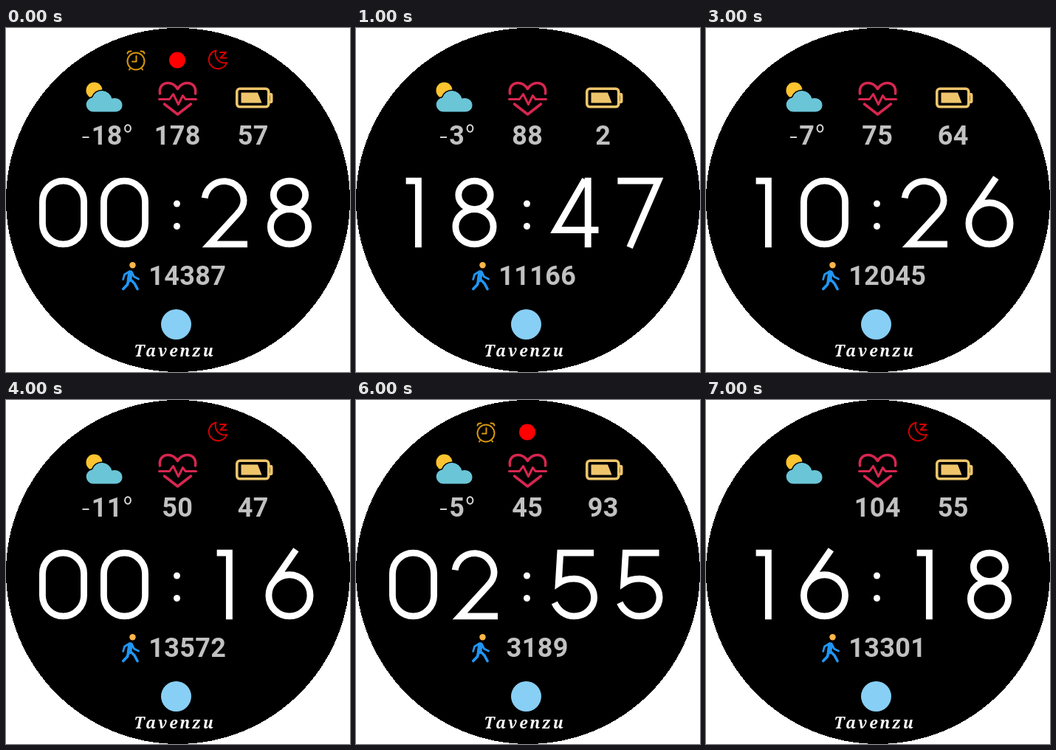
An HTML page that plays this animation: 466 by 466 pixels, repeating every 8 s.

```html
<!DOCTYPE html>
<html lang="en">
<head>
<meta charset="utf-8">
<title>Watch face</title>
<style>
html, body { margin: 0; width: 100%; height: 100%; overflow: hidden; background: #fff; }
svg { display: block; width: 100vw; height: 100vh; }
.num { font: 700 36px Roboto, "Liberation Sans", sans-serif; fill: #c1c1c1; text-anchor: middle; }
.brand { font: italic 900 21px "Noto Serif", "Liberation Serif", serif; letter-spacing: 2.8px; fill: #fff; text-anchor: middle; }
.line { fill: none; stroke-linecap: round; stroke-linejoin: round; }
</style>
</head>
<body>
<svg viewBox="0 0 466 466">
  <circle cx="233" cy="233" r="233" shape-rendering="crispEdges"/>

  <g id="alarm" class="line" stroke="#d6960f" stroke-width="2">
    <circle cx="176" cy="45" r="11.5"/>
    <path d="M176.5 38V45.5H171M164.5 34.500Q165 31 169.500 31.500M187.500 34.500Q187 31 182.500 31.500M168 55L167 56.500M184 55L185 56.500"/>
  </g>
  <circle id="link" cx="232" cy="43.5" r="11" fill="#f00"/>
  <g id="moon" class="line" stroke="#d80000" stroke-width="1.9">
    <path d="M284.5 30.5A12.5 12.5 0 1 0 299 47A12.5 12.5 0 0 1 284.5 30.5Z"/>
    <path d="M290 33H298L290.5 40.5H298.5"/>
  </g>

  <circle cx="119.5" cy="84.500" r="11" fill="#fcc42e"/>
  <path d="M118.5 113.500A9.700 9.700 0 0 1 117 94.200A13.700 13.700 0 0 1 143.300 95.600C151 93.500 157.500 98 157.500 104.500C157.500 110 153.500 113.500 148.500 113.500Z"
    fill="#6ac5d7" stroke="#000" stroke-width="3" paint-order="stroke"/>

  <g class="line" stroke="#d7264f" stroke-width="3.5">
    <path d="M208.5 89C207 79 213 74.5 219.5 74.5C226 74.5 230 78.5 232.5 82.5C235 78.5 239 74.5 245.5 74.5C252 74.5 258 79 256.5 89"/>
    <path d="M214.5 103L232.5 117L250.5 103"/>
    <path d="M207.5 96.5H221.5L226.5 89.5L233.5 103.5L239.5 91.5L243 96.5H257.5" stroke-width="3"/>
  </g>

  <g fill="#efc56c" transform="translate(.5 0)">
    <rect x="312.3" y="82.3" width="43" height="24.5" rx="4" fill="none" stroke="#efc56c" stroke-width="3.6"/>
    <path d="M318 87.5H340.5L346 101.5H318Z"/>
    <path d="M356 88H358.5Q361 88 361 91V99Q361 102 358.5 102H356V98.5H357.5V91.5H356Z"/>
  </g>

  <g id="temp"></g>
  <g id="pulse"></g>
  <g id="power"></g>
  <g id="clock" fill="none" stroke="#fff" stroke-width="9" stroke-miterlimit="6"></g>
  <g fill="#fff"><circle cx="231.5" cy="238" r="4.5"/><circle cx="231.5" cy="268.5" r="4.5"/></g>

  <circle cx="171.5" cy="321.3" r="4.2" fill="#ffb64a"/>
  <g class="line" stroke="#2196f3" stroke-width="2.8">
    <path d="M168.5 331.5L167 341" stroke-width="6.5"/>
    <path d="M167 330L160.5 334L158.7 340.5M170.5 331L173.5 337L179.5 340"/>
    <path d="M166 341L164.5 347.5L158.8 353.5M168 340L174 346L178 353.5" stroke-width="3.7"/>
  </g>
  <g id="steps"></g>

  <circle cx="230.5" cy="401.5" r="20.5" fill="#88cff5"/>
  <text class="brand" x="228.5" y="444.5">Tavenzu</text>
</svg>
<script>
const $ = id => document.getElementById(id);

// Large numerals as strokes, centred on the origin, 96 units tall.
const glyphs = {
  0: "M-28.5 -15A28.5 28.5 0 0 1 28.5 -15V15A28.5 28.5 0 0 1 -28.5 15Z",
  1: "M-10 -43.5H7V48",
  2: "M-26.7 -20A27 27 0 0 1 27 -16.5C27 -8 23 -3 18 2L-20 43.5H32",
  4: "M33.5 24H-25L15 -45.5M19 -48V48",
  5: "M27 -43.5H-19L-21.5 -2C-15 -6.500 -8 -8 0 -8A27.5 25.700 0 0 1 0 43.5C-12 43.5 -22 36 -27 25",
  6: "M9 -48L-23.5 -1M-28.5 15A28.5 28.5 0 1 1 28.5 15A28.5 28.5 0 1 1 -28.5 15Z",
  7: "M-30 -43.5H26L-13.5 48",
  8: "M-22 -24A22 19.5 0 1 1 22 -24A22 19.5 0 1 1 -22 -24ZM-26 19.5A26 24 0 1 1 26 19.5A26 24 0 1 1 -26 19.5Z"
};
const cells = [77.5, 160.5, 295.5, 384];
const pitch = 21;

// time, temperature, pulse, battery, steps, status icons
const states = [
  ["0028", 18, 178, 57, 14387, "alarm link moon"],
  ["1847", 3, 88, 2, 11166, ""],
  ["1204", 18, 100, 91, 12712, ""],
  ["1026", 7, 75, 64, 12045, ""],
  ["0016", 11, 50, 47, 13572, "moon"],
  ["2140", 8, 62, 78, 10428, "link"],
  ["0255", 5, 45, 93, 3189, "alarm link"],
  ["1618", null, 104, 55, 13301, "moon"]
];

function digits(value, cx, y) {
  const s = String(value);
  return [...s].map((c, i) =>
    `<text class="num" x="${cx + (i - (s.length - 1) / 2) * pitch}" y="${y}">${c}</text>`).join("");
}

function temperature(value) {
  if (value === null) return "";
  const cx = 136.5, side = String(value).length * pitch / 2 + 7.5;
  return `<path d="M${cx - side - 4.5} 148h9" stroke="#d0d0d0" stroke-width="2"/>` +
    digits(value, cx, 158.3) +
    `<ellipse cx="${cx + side}" cy="136" rx="3.9" ry="4.7" fill="none" stroke="#d8d8d8" stroke-width="2"/>`;
}

function show([time, temp, pulse, power, steps, icons]) {
  $("clock").innerHTML = [...time].map((c, i) =>
    `<path transform="translate(${cells[i]} 250) scale(.985)" d="${glyphs[c]}"/>`).join("");
  $("temp").innerHTML = temperature(temp);
  $("pulse").innerHTML = digits(pulse, 232, 158.3);
  $("power").innerHTML = digits(power, 334.5, 158.3);
  $("steps").innerHTML = digits(steps, 245.5, 348.3);
  for (const id of ["alarm", "link", "moon"])
    $(id).style.display = icons.includes(id) ? "" : "none";
}

let last = -1;
function tick() {
  const i = Math.floor(performance.now() / 1000) % states.length;
  if (i !== last) show(states[last = i]);
  requestAnimationFrame(tick);
}
tick();
</script>
</body>
</html>
```
